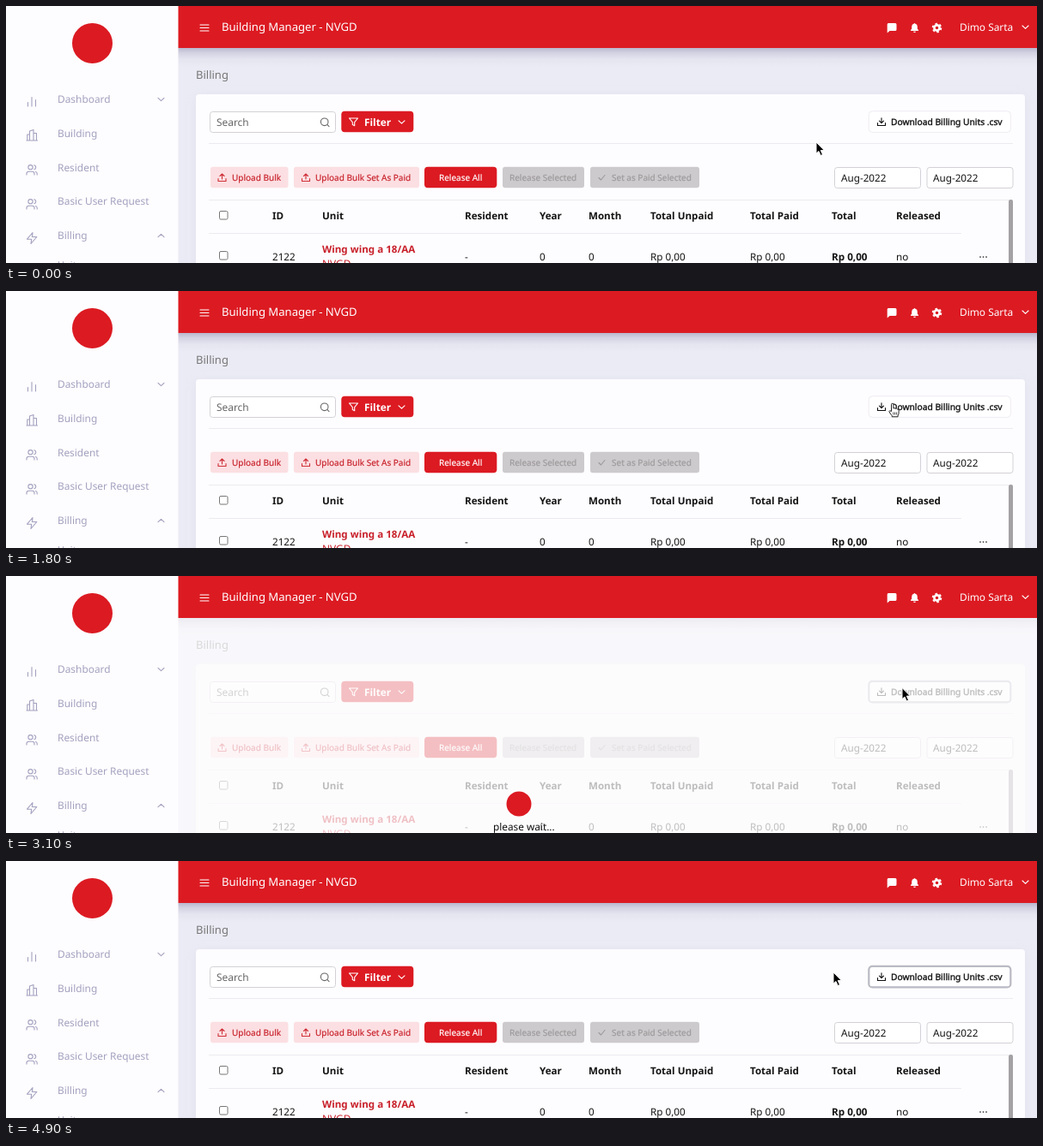
An HTML page for the animation above (5 s loop, 1200 by 300 pixels).

```html
<!DOCTYPE html>
<html lang="en">
<head>
<meta charset="utf-8">
<title>Billing</title>
<style>
html, body { margin: 0; width: 100%; height: 100%; overflow: hidden; background: #fdfcfe; }
svg { display: block; width: 100vw; height: 100vh; }
text { font-family: "Noto Sans", "Open Sans", sans-serif; font-size: 11.9px; stroke-width: 0; text-rendering: geometricPrecision; white-space: pre; }
.b { font-weight: 700; font-size: 11.6px; }
.s { font-size: 10px; stroke-width: .18; }
.m { font-size: 10.25px; stroke-width: .35; }
.line { fill: none; stroke-width: 1.1; stroke-linecap: round; stroke-linejoin: round; }
.box { fill: #fff; stroke: #d3d1d6; }
.rule { fill: none; stroke: #ecebef; }
</style>
</head>
<body>
<svg viewBox="0 0 1200 300" preserveAspectRatio="none">
  <defs>
    <linearGradient id="shade" x2="0" y2="1">
      <stop offset="0" stop-color="#b9b6cd"/>
      <stop offset=".25" stop-color="#d3d2e2"/>
      <stop offset=".6" stop-color="#e5e5f0"/>
      <stop offset="1" stop-color="#ebebf5"/>
    </linearGradient>
    <filter id="soft" x="-10%" y="-20%" width="120%" height="140%"><feGaussianBlur stdDeviation="6"/></filter>
    <g id="users" class="line">
      <circle cx="5" cy="3.2" r="2.6"/>
      <path d="M.5 12V10.700Q.5 8.300 3 8.300H7Q9.500 8.300 9.500 10.700V12M9.300.700Q11.300 1.300 11.300 3.200T9.300 5.700M11 8.500Q12.700 9 12.700 10.700V12"/>
    </g>
    <path id="up" class="line" d="M0 6V9H9V6M4.500 6.500V.5M2 3 4.500.5 7 3"/>
    <path id="down" class="line" d="M0 6V9H9V6M4.500.2V6M2 3.700 4.500 6.200 7 3.700"/>
    <path id="chev" class="line" d="M-3.500-1.700 0 1.700 3.500-1.700"/>
  </defs>

  <rect x="200" width="1000" height="300" fill="#ebebf5"/>
  <rect x="221" y="105" width="965" height="220" fill="#dcdcea" opacity=".6" filter="url(#soft)"/>
  <rect x="200" y="49" width="1000" height="22" fill="url(#shade)"/>
  <rect x="221" y="103" width="965" height="210" rx="4" fill="#fdfcfe"/>

  <g id="card">
    <rect class="box" x="237.500" y="123.500" width="146" height="24" rx="3"/>
    <g class="line" stroke="#666"><circle cx="370.700" cy="135.300" r="4.300"/><path d="M374 138.600 376 140.600"/></g>
    <rect x="390.300" y="122.800" width="84" height="24.500" rx="4" fill="#dc1a22"/>
    <path class="line" stroke="#fff" d="M399.500 131H409.500L405.700 135.600V139.700L403.300 138.500V135.600Z"/>
    <use href="#chev" x="460.500" y="135.500" stroke="#fff"/>
    <rect id="download" x="1004.300" y="122.800" width="165" height="24.600" rx="4" fill="#fff"/>
    <use href="#down" x="1014.500" y="130.500" stroke="#111"/>
    <path class="rule" d="M236 160.500H1172M236 226.500H1167M236 265.500H1112"/>
    <g fill="#fbdfe2"><rect x="238" y="187.800" width="90.500" height="24.500" rx="3"/><rect x="335" y="187.800" width="146" height="24.500" rx="3"/></g>
    <rect x="487" y="187.800" width="84.300" height="24.500" rx="4" fill="#dc1a22"/>
    <g fill="#cccacc"><rect x="578" y="187.800" width="95" height="24.500" rx="3"/><rect x="680" y="187.800" width="127" height="24.500" rx="3"/></g>
    <g stroke="#cf3038"><use href="#up" x="247" y="195.500"/><use href="#up" x="344.500" y="195.500"/></g>
    <path class="line" stroke="#9d999c" d="M690 200.500 692.500 203 697 197.500"/>
    <rect class="box" x="964.500" y="188.500" width="100" height="24" rx="3"/>
    <rect class="box" x="1072" y="188.500" width="100" height="24" rx="3"/>
    <g fill="#fff" stroke="#777"><rect x="248.500" y="239.500" width="9.500" height="9.500" rx="1.500"/><rect x="248.500" y="286.500" width="9.500" height="9.500" rx="1.500"/></g>
    <rect x="1167" y="226" width="5" height="90" rx="2" fill="#a3a1a4"/>
    <g fill="#555"><circle cx="1134" cy="293" r=".9"/><circle cx="1137.500" cy="293" r=".9"/><circle cx="1141" cy="293" r=".9"/></g>
  </g>

  <g id="wait">
    <rect x="200" y="49" width="1000" height="251" fill="#fefdfe" opacity=".73"/>
    <circle cx="597" cy="266" r="14.500" fill="#dc1a22"/>
  </g>

  <rect x="200" width="1000" height="49" fill="#dc1a22"/>
  <g id="bar" fill="#fff">
    <path class="line" stroke="#fff" d="M226 22H236M226 25.500H236M226 29H236"/>
    <path d="M1027 20H1035Q1036.500 20 1036.500 21.500V27.500Q1036.500 29 1035 29H1028.500L1025.700 31.500V21.500Q1025.700 20 1027 20Z"/>
    <path d="M1053 29V28L1054.200 26.700V24Q1054.200 21.400 1056.600 20.800Q1057.500 19 1058.400 20.800Q1060.800 21.400 1060.800 24V26.700L1062 28V29ZM1056 29.700H1059Q1058.700 31 1057.500 31T1056 29.700Z"/>
    <circle cx="1083.500" cy="25.500" r="3.100" fill="none" stroke="#fff" stroke-width="2.600"/>
    <circle cx="1083.500" cy="25.500" r="4.900" fill="none" stroke="#fff" stroke-width="1.800" stroke-dasharray="2.560 2.560"/>
    <use href="#chev" x="1186.500" y="24.700" stroke="#fff"/>
  </g>

  <rect width="200.500" height="300" fill="#fdfcfe"/>
  <circle cx="100.500" cy="43.500" r="23.500" fill="#dc1a22"/>
  <g id="side" stroke="#a3a1bf">
    <path class="line" stroke-width="1.700" d="M25.500 112.500V117M30 106.500V117M34.500 109.500V117"/>
    <path class="line" d="M24 157H36.500M27.500 157V146L32 144.500V157M27.500 150H24.800V157M32 148.500H35.500V157"/>
    <use href="#users" x="23.500" y="185"/><use href="#users" x="23.500" y="225"/>
    <path class="line" d="M31 264.500 24.500 272.200H29.700L29 277.500 35.800 269.500H30.400Z"/>
    <use href="#chev" x="180.500" y="109"/>
    <use href="#chev" transform="translate(180.500 268) scale(1 -1)"/>
  </g>

  <g id="pointer" stroke-linejoin="round">
    <path id="arrow" d="M0 0V13.200L3 10.500 5.200 15.500 7.500 14.500 5.300 9.600H9.400Z" fill="#000" stroke="#fff" stroke-width="1"/>
    <g id="hand" fill="#fff" stroke="#222" stroke-width="1">
      <path d="M-1 1.500Q-1 .3.200.3T1.400 1.500V6Q2.600 5 3.600 6.300Q5 5.500 5.800 6.900Q7.600 6.600 7.600 8.500V11Q7.600 13 6.600 14V15.800H-.3V14.500Q-2.500 12.300-3.600 9.600Q-3.400 7.800-1 9.500Z"/>
      <path d="M1.300 10.500V13.500M3.200 10.500V13.500M5.100 10.500V13.500" stroke-width=".8"/>
    </g>
  </g>
</svg>
<script>
const $ = id => document.getElementById(id);

function label(parent, x, y, str, color, cls = "", size) {
  const el = document.createElementNS("http://www.w3.org/2000/svg", "text");
  const attrs = { x, y, fill: color, stroke: color, class: cls };
  for (const key in attrs) el.setAttribute(key, attrs[key]);
  if (size) el.style.fontSize = size + "px";
  el.textContent = str;
  $(parent).append(el);
}

const ink = "#141414", red = "#c8202a", gray = "#9d999c", lilac = "#a3a1bf";

label("bar", 251, 29, "Building Manager - NVGD", "#fff", "", 13.1);
label("bar", 1110, 29, "Dimo Sarta", "#fff");
["Dashboard", "Building", "Resident", "Basic User Request", "Billing"]
  .forEach((name, i) => label("side", 60, 113 + i * 39.8, name, lilac));
label("side", 60, 306, "Units", lilac, "", 11);

label("card", 221, 85, "Billing", "#777", "", 13);
label("card", 245, 140, "Search", "#666");
label("card", 417, 140, "Filter", "#fff", "b", 11.8);
label("card", 1030, 139, "Download Billing Units .csv", "#111", "m");
label("card", 263, 204, "Upload Bulk", red, "s");
label("card", 360, 204, "Upload Bulk Set As Paid", red, "s");
label("card", 504, 204, "Release All", "#fff", "s");
label("card", 586, 204, "Release Selected", gray, "s");
label("card", 705, 204, "Set as Paid Selected", gray, "s");
for (const x of [972, 1079]) label("card", x, 205, "Aug-2022", ink, "", 11.7);

const table = [
  [310, "ID", "2122"], [368, "Unit"], [534, "Resident", "-"], [621, "Year", "0"],
  [678, "Month", "0"], [750, "Total Unpaid", "Rp 0,00"], [866, "Total Paid", "Rp 0,00"],
  [961, "Total", "Rp 0,00"], [1036, "Released", "no"]
];
for (const [x, head, cell] of table) {
  label("card", x, 249, head, ink, "b");
  if (cell) label("card", x, 296.5, cell, ink, head === "Total" ? "b" : "", 11.7);
}
label("card", 368, 287.5, "Wing wing a 18/AA", red, "b");
label("card", 368, 304.5, "NVGD", red);
label("wait", 567, 297, "please wait...", "#111", "", 11.8);

// Pointer stops: time, x, y
const path = [
  [0, 943, 159], [500, 943, 159], [1100, 965.5, 145], [1300, 965.5, 145],
  [1800, 1031.5, 131], [1900, 1031.5, 131], [2300, 1043, 130.5],
  [3600, 1043, 130.5], [4200, 963, 130], [5000, 963, 130]
];

function pointerAt(t) {
  const i = path.findIndex(p => p[0] > t);
  const [t0, x0, y0] = path[i - 1], [t1, x1, y1] = path[i];
  const u = (t - t0) / (t1 - t0), k = u * u * (3 - 2 * u);
  return [x0 + (x1 - x0) * k, y0 + (y1 - y0) * k];
}

const show = (id, on) => $(id).setAttribute("display", on ? "inline" : "none");

function draw(now) {
  const t = Math.floor(now % 5000 / 100) * 100;
  const [x, y] = pointerAt(t);
  const loading = t >= 2700 && t < 3200;
  const over = x > 1004 && !loading;
  const focus = t >= 2600;
  $("pointer").setAttribute("transform", `translate(${x} ${y})`);
  show("hand", over);
  show("arrow", !over);
  show("wait", loading);
  $("download").setAttribute("stroke", focus ? "#b9bac3" : "#eeecf1");
  $("download").setAttribute("stroke-width", focus ? 2.2 : 1);
}

const start = performance.now();
function tick() {
  draw(performance.now() - start);
  requestAnimationFrame(tick);
}
tick();
</script>
</body>
</html>
```
